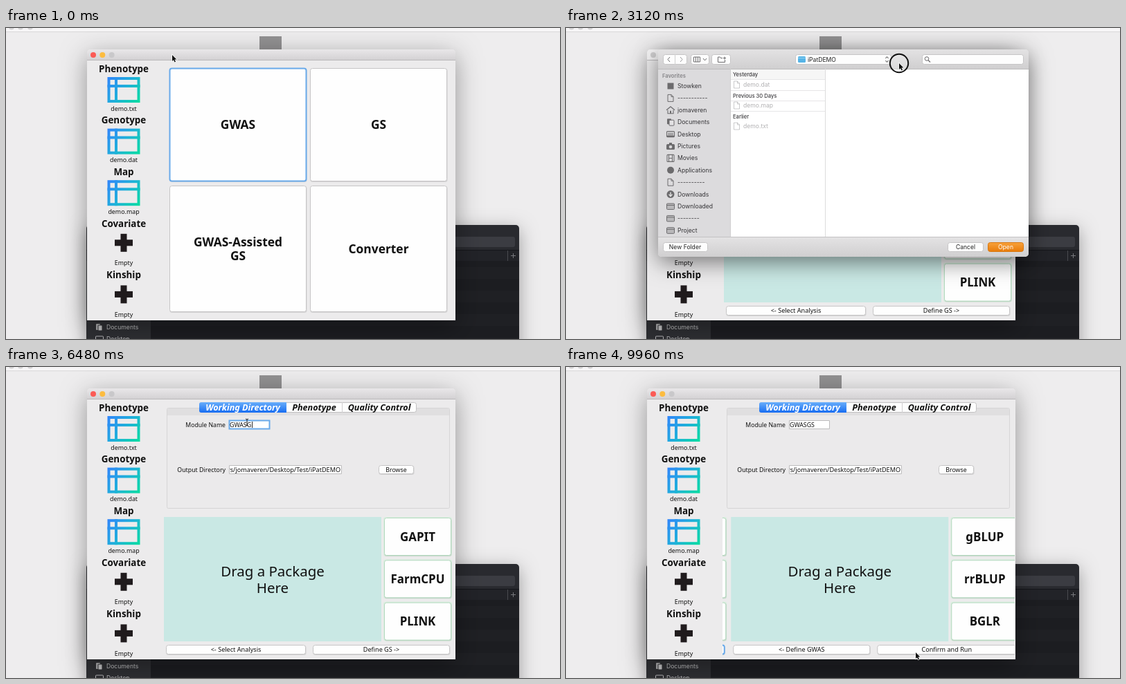
Recreate the animation shown at these times as an HTML page with a canvas. Size 800x450 px, loop 10 s.

```html
<!DOCTYPE html>
<html lang="en">
<head>
<meta charset="utf-8">
<title>Analysis setup</title>
<style>
html, body { margin: 0; width: 100%; height: 100%; overflow: hidden; background: #eeedee; }
canvas { display: block; }
</style>
</head>
<body>
<canvas id="stage" width="800" height="450"></canvas>
<script>
const c = document.getElementById('stage').getContext('2d');
const LOOP = 10000, PAGE = 422;
const UI = '"Noto Sans", "Open Sans", sans-serif', SYS = 'Inter, Roboto, sans-serif';
const BODY = '#ecebec', LINE = '#c6c5c6', FOCUS = '#69aaea', USER = 'jomaveren';

const clamp = v => Math.max(0, Math.min(1, v));
const within = (t, a, b) => t >= a && t < b;

// Cursor stops: time, x, y
const path = [
  [0, 240, 39], [620, 338, 318], [1150, 338, 318], [1800, 541, 151], [1920, 556, 149],
  [2250, 556, 149], [2900, 481, 51], [3200, 481, 51], [3750, 634, 317], [4250, 634, 317],
  [5000, 348, 80], [6650, 348, 80], [7300, 586, 319], [7750, 586, 319], [8250, 400, 316],
  [8600, 400, 316], [9200, 505, 413], [10000, 505, 413]
];
const presses = [[720, 860], [1940, 2080], [3000, 3240], [3860, 4000], [5160, 5280],
  [5360, 5480], [7380, 7540], [8380, 8520], [9320, 9500]];

function cursorAt(t) {
  let i = 0;
  while (i < path.length - 2 && t >= path[i + 1][0]) i++;
  const [t0, x0, y0] = path[i], [t1, x1, y1] = path[i + 1];
  let k = clamp((t - t0) / (t1 - t0));
  k = k * k * (3 - 2 * k);
  return [x0 + (x1 - x0) * k, y0 + (y1 - y0) * k];
}

function rect(x, y, w, h, fill) {
  c.fillStyle = fill;
  c.fillRect(x, y, w, h);
}
function box(x, y, w, h, r, fill, stroke, lw = 1) {
  c.beginPath();
  c.roundRect(x, y, w, h, r);
  if (fill) { c.fillStyle = fill; c.fill(); }
  if (stroke) { c.strokeStyle = stroke; c.lineWidth = lw; c.stroke(); }
}
function disc(x, y, r, fill) {
  c.beginPath();
  c.arc(x, y, r, 0, 7);
  c.fillStyle = fill;
  c.fill();
}
function stroke(points, color, lw = 1) {
  c.beginPath();
  points.forEach(([x, y], i) => i ? c.lineTo(x, y) : c.moveTo(x, y));
  c.strokeStyle = color;
  c.lineWidth = lw;
  c.stroke();
}
// y is the middle of the capitals
function text(s, x, y, size, { align = 'center', style = '', color = '#111', family = UI } = {}) {
  c.font = `${style} ${size}px ${family}`;
  c.textAlign = align;
  c.fillStyle = color;
  c.fillText(s, x, y + size * 0.36);
}
const left = { align: 'left' }, bold = { style: 'bold' };
const sys = (s, x, y, o = {}) => text(s, x, y, o.size || 8.6, { align: 'left', family: SYS, color: '#444', ...o });

function shade(y0, y1, a, b) {
  const g = c.createLinearGradient(0, y0, 0, y1);
  g.addColorStop(0, a);
  g.addColorStop(1, b);
  return g;
}
const blue = (y, h) => shade(y, y + h, '#69aefa', '#176df2');

function shadowed(draw, blur, alpha, dy) {
  c.save();
  c.shadowColor = `rgba(0,0,0,${alpha})`;
  c.shadowBlur = blur;
  c.shadowOffsetY = dy;
  draw();
  c.restore();
}
function clipped(x, y, w, h, draw) {
  c.save();
  c.beginPath();
  c.rect(x, y, w, h);
  c.clip();
  draw();
  c.restore();
}

function backdrop() {
  rect(0, 0, 800, 450, '#eeedee');
  rect(0, 0, 800, 5, '#f7f6f7');
  rect(0, 5, 800, 1, '#d9d8d9');
  for (const x of [8, 21, 35]) disc(x, -1.5, 4, '#d3d2d3');
  rect(366, 12, 32, 32, '#929192');

  shadowed(() => box(116, 285, 625, 200, 5, '#292a2f'), 26, 0.35, 6);
  box(640, 302, 95, 15, 3, '#3b3c42');
  rect(116, 321, 625, 16, '#222328');
  rect(116, 321, 625, 1, '#15161a');
  rect(724, 322, 1, 15, '#4a4b50');
  stroke([[729, 329.5], [736, 329.5]], '#77787d');
  stroke([[732.5, 326], [732.5, 333]], '#77787d');
  rect(209, 337, 532, 113, '#1c1d21');
  for (let y = 346; y < 450; y += 34) rect(209, y, 532, 17, '#1f2024');
  rect(116, 337, 93, 113, '#2e2f33');
  box(130, 428, 6, 9, 1, '#a8a8aa');
  box(133, 430, 6, 8, 1, '#c2c2c4', '#2e2f33');
  sys('Documents', 145, 433, { color: '#c0c0c2' });
  box(129.5, 446, 11, 7, 1, null, '#b5b5b7');
  sys('Desktop', 145, 450, { color: '#c0c0c2' });
}

function tableIcon(x, y) {
  const g = c.createLinearGradient(x, y, x + 46, y + 37);
  g.addColorStop(0, '#3284fb');
  g.addColorStop(0.5, '#1fb0da');
  g.addColorStop(1, '#08dda0');
  c.strokeStyle = g;
  c.lineWidth = 4;
  c.strokeRect(x + 2, y + 2, 43, 33);
  stroke([[x + 12.5, y], [x + 12.5, y + 37]], g, 4);
  stroke([[x, y + 13], [x + 47, y + 13]], g, 4);
}
function plusIcon(x, y) {
  rect(x - 13, y - 4.5, 26, 9, '#201b1d');
  rect(x - 4.5, y - 13, 9, 26, '#201b1d');
}

function appWindow(active) {
  shadowed(() => box(117, 31, 532, 392, [5, 5, 0, 0], BODY), 36, 0.38, 9);
  box(117, 31, 532, 15, [5, 5, 0, 0], active ? shade(31, 46, '#e9e7e9', '#d3d1d3') : '#f4f3f4');
  rect(117, 46, 532, 1, '#bbb9bb');
  const lights = active ? ['#fb5b56', '#fcbc40', '#c9c8ca'] : Array(3).fill('#cfcecf');
  lights.forEach((col, i) => disc(126 + i * 13.3, 39, 4, col));
  const inputs = [['Phenotype', 'demo.txt'], ['Genotype', 'demo.dat'], ['Map', 'demo.map'],
    ['Covariate', 'Empty'], ['Kinship', 'Empty']];
  inputs.forEach(([title, file], i) => {
    const y = 59 + i * 74.6;
    text(title, 170, y, 13.4, bold);
    if (i < 3) tableIcon(146.5, y + 12);
    else plusIcon(170, y + 28);
    text(file, 170, y + 57.3, 8.9);
  });
}

function button(label, x, y, w, h, size, { border = LINE, focus, style = '', pressed } = {}) {
  box(x + 0.5, y + 1, w, h, 3, 'rgba(0,0,0,.1)');
  box(x + 0.5, y + 0.5, w - 1, h - 1, 3, pressed ? blue(y, h) : '#fefefe', focus ? FOCUS : border, focus ? 2 : 1);
  const lines = label.split('\n');
  lines.forEach((s, i) => text(s, x + w / 2, y + h / 2 + (i - (lines.length - 1) / 2) * 20, size, { style }));
}

function menu(t) {
  const big = (s, x, y, h, focus) => button(s, x, y, 198, h, 17.4, { style: 'bold', focus });
  const chosen = t > 720;
  big('GWAS', 236, 58, 164, !chosen);
  big('GS', 439, 58, 164);
  big('GWAS-Assisted\nGS', 236, 228, 183, chosen);
  big('Converter', 439, 228, 183);
}

function tabs(labels, edges, y) {
  const x = edges[0], w = edges[edges.length - 1] - x;
  box(x + 0.5, y + 0.5, w - 1, 14, 3, '#fdfdfd', '#c2c1c2');
  box(x, y, edges[1] - x, 15, [3, 0, 0, 3], blue(y, 15));
  labels.forEach((s, i) => {
    if (i > 1) rect(edges[i], y, 1, 15, '#cfcecf');
    text(s, (edges[i] + edges[i + 1]) / 2, y + 7.3, 12.6,
      { style: 'italic bold', color: i ? '#111' : '#fff' });
  });
}
function group(x, y, w, h) {
  box(x + 0.5, y + 0.5, w - 1, h - 1, 2, '#ebeaeb', '#d6d5d6');
  rect(x + 1, y + 1, w - 2, 10, '#e0dfe0');
}
function field(x, y, w, focus) {
  box(x + 0.5, y + 0.5, w - 1, 12, 0, '#fff', focus ? FOCUS : '#bdbcbd', focus ? 2 : 1);
}

function directoryPanel(t) {
  group(232, 59, 409, 146);
  tabs(['Working Directory', 'Phenotype', 'Quality Control'], [279, 405, 485, 593], 51);
  text('Module Name', 317, 83.5, 8.7, { align: 'right' });
  const editing = within(t, 5160, 7400);
  field(322, 77, 59, editing);
  const typed = Math.floor((t - 5550) / 170);
  const name = typed < 1 ? 'Project' : 'GWASGS'.slice(0, typed);
  if (within(t, 5360, 5720)) rect(323, 78, 31, 11, '#a9cdf8');
  text(name, 323, 83.5, 8.8, left);
  if (editing && typed > 0 && t % 1000 < 600) rect(324 + c.measureText(name).width, 79, 1, 9, '#222');

  text('Output Directory', 317, 148.5, 8.8, { align: 'right' });
  field(322, 142, 163);
  clipped(323, 142, 161, 13, () => {
    if (t < 4080) text('/Users/' + USER, 323, 148.5, 8.9, left);
    else text(`/Users/${USER}/Desktop/Test/iPatDEMO`, 483, 148.5, 9.1, { align: 'right' });
  });
  button('Browse', 538, 142, 51, 13, 8.8, { pressed: within(t, 1940, 2080) });
}

function dropZone(lines, fill) {
  rect(228, 217, 314, 180, fill);
  lines.forEach((s, i) => text(s, 385, 307.5 + (i - (lines.length - 1) / 2) * 24, 20.5));
}
function packages(names, focused) {
  names.forEach((s, i) => {
    const y = 218 + i * 61.3;
    box(545, y - 1, 99, 57, 3, '#dcefe1');
    button(s, 546, y, 97, 55, 16.9, { style: 'bold', border: '#b3d8be', focus: s === focused });
  });
}

function details() {
  rect(228, 217, 314, 180, '#c9dfeb');
  rect(233, 227, 304, 165, '#e9e8e9');
  group(234, 227, 302, 163);
  tabs(['FarmCPU input', 'Covariates'], [292, 398, 478], 219);
  text('Method bin', 323, 272, 8.8, left);
  box(376.5, 265.5, 68, 13, 3, '#fff', LINE);
  box(433, 265, 12, 14, [0, 3, 3, 0], blue(265, 14));
  stroke([[437, 270.5], [439, 268], [441, 270.5]], '#fff');
  stroke([[437, 273.5], [439, 276], [441, 273.5]], '#fff');
  text('optimum', 384, 272, 8.8, left);
  text('maxLoop :', 322, 320, 8.8, left);
  text('10', 409, 320, 8.8);
  box(330, 337, 110, 2, 1, '#b5b4b5');
  for (let i = 0; i < 10; i++) {
    const x = 331 + i * 12.05;
    rect(x - 0.5, 344, 1, 3.5, '#555');
    text(String(i + 1), x, 354, 8.8);
  }
  c.beginPath();
  c.moveTo(434.5, 333);
  c.lineTo(445.5, 333);
  c.lineTo(445.5, 339);
  c.lineTo(440, 345);
  c.lineTo(434.5, 339);
  c.closePath();
  c.fillStyle = '#fff';
  c.fill();
  c.strokeStyle = '#b4b3b4';
  c.lineWidth = 1;
  c.stroke();
}

const footer = (s, x, w, o) => button(s, x, 402, w, 14, 9.1, o);

function gwasPage(t) {
  if (t < 7500) dropZone(['Drag a Package', 'Here'], '#c9e8e4');
  else if (t < 8520) dropZone(['FarmCPU', 'Selected', '(Tap for details)'], '#c9dfeb');
  else details();
  packages(['GAPIT', 'FarmCPU', 'PLINK'], within(t, 7400, 8380) ? 'FarmCPU' : '');
  footer('<- Select Analysis', 231, 202);
  footer('Define GS ->', 443, 198, { pressed: within(t, 9320, 9500), focus: t >= 9500 });
}
function gsPage() {
  dropZone(['Drag a Package', 'Here'], '#c9e8e4');
  packages(['gBLUP', 'rrBLUP', 'BGLR']);
  footer('<- Define GWAS', 231, 198);
  footer('Confirm and Run', 439, 201);
}

function slide(p, from, to) {
  const page = (dx, draw) => {
    if (Math.abs(dx) >= PAGE) return;
    c.save();
    c.translate(dx, 0);
    draw();
    c.restore();
  };
  clipped(226, 47, PAGE, 376, () => {
    page(-PAGE * p, from);
    page(PAGE * (1 - p), to);
  });
}

function sideIcon(kind, x, y) {
  const ink = '#6c6b6d';
  const frame = (w, h) => box(x - w / 2, y - h / 2, w, h, 1, null, ink, 1.1);
  if (kind === 'disc') disc(x, y, 5, ink);
  else if (kind === 'square') rect(x - 4.5, y - 4.5, 9, 9, ink);
  else if (kind === 'page') {
    stroke([[x + 1, y - 5], [x - 4, y - 5], [x - 4, y + 5], [x + 4, y + 5], [x + 4, y - 2], [x + 1, y - 5], [x + 1, y - 2], [x + 4, y - 2]], ink);
  } else if (kind === 'home') {
    stroke([[x - 6, y], [x, y - 5], [x + 6, y]], ink, 1.3);
    stroke([[x - 4, y], [x - 4, y + 5], [x + 4, y + 5], [x + 4, y]], ink, 1.1);
    rect(x - 1, y + 1, 2, 4, ink);
  } else if (kind === 'pages') {
    box(x - 5, y - 5, 6, 8, 1, ink);
    box(x - 2, y - 3, 7, 8, 1, '#e3e2e4', ink);
  } else if (kind === 'screen') {
    frame(11, 8);
    rect(x - 4, y - 2, 8, 4, '#a4a3a5');
    rect(x - 5, y + 2, 10, 2, ink);
  } else if (kind === 'camera') {
    box(x - 6, y - 3, 12, 8, 1.5, ink);
    rect(x - 2, y - 5, 4, 2, ink);
    disc(x, y + 1, 2.3, '#d7d6d8');
  } else if (kind === 'film') {
    frame(10, 10);
    rect(x - 3, y - 5, 1, 10, ink);
    rect(x + 2, y - 5, 1, 10, ink);
    rect(x - 3, y - 0.5, 6, 1, ink);
  } else if (kind === 'down') {
    disc(x, y, 5.5, ink);
    stroke([[x, y - 3], [x, y + 3]], '#eee', 1.3);
    stroke([[x - 2.5, y], [x, y + 3], [x + 2.5, y]], '#eee', 1.2);
  } else {
    box(x - 5.5, y - 4, 11, 8.5, 1, '#b9b8ba', ink);
    rect(x - 5, y - 2, 10, 1, ink);
  }
}

const places = [['Stowken', 'square'], ['-----------', 'page'], [USER, 'home'], ['Documents', 'pages'],
  ['Desktop', 'screen'], ['Pictures', 'camera'], ['Movies', 'film'], ['Applications', 'disc'],
  ['----------', 'page'], ['Downloads', 'down'], ['Downloaded', 'folder'], ['--------', 'folder'],
  ['Project', 'folder']];

function dialogButton(x, y, w, h, fill = '#fdfdfd', edge = '#c6c5c6') {
  box(x + 0.5, y + 0.5, w - 1, h - 1, 3, fill, edge);
}

function dialog() {
  shadowed(() => box(133, 31, 535, 300, 5, BODY), 32, 0.5, 8);
  c.save();
  c.beginPath();
  c.roundRect(133, 31, 535, 300, 5);
  c.clip();
  rect(133, 31, 535, 28, shade(31, 59, '#e3e2e3', '#d0cfd0'));
  rect(133, 59, 104, 243, '#dcdbdd');
  rect(237, 59, 431, 243, '#fff');
  rect(133, 302, 535, 29, shade(302, 331, '#e4e3e4', '#d0cfd0'));
  rect(133, 59, 535, 1, '#bdbcbd');
  rect(133, 302, 535, 1, '#c3c2c3');
  rect(237, 59, 1, 243, '#d0cfd0');
  rect(374, 59, 1, 243, '#dddcdd');
  c.restore();

  const ink = '#6b6a6c';
  dialogButton(140, 38, 35, 15);
  rect(157, 38, 1, 15, '#d0cfd0');
  stroke([[150, 42], [147, 45.5], [150, 49]], ink);
  stroke([[165, 42], [168, 45.5], [165, 49]], '#9a999b');
  dialogButton(180, 38, 27, 15);
  box(184.5, 42, 9, 7, 0, null, ink);
  rect(187, 42, 1, 7, ink);
  rect(190, 42, 1, 7, ink);
  stroke([[198, 44], [200.5, 47], [203, 44]], ink);
  dialogButton(210, 38, 28, 15);
  stroke([[226, 43.5], [223.5, 43.5], [222.5, 42], [219.5, 42], [219.5, 49.5], [229.5, 49.5], [229.5, 46]], ink);
  stroke([[227, 43.5], [231, 43.5]], ink);
  stroke([[229, 41.5], [229, 45.5]], ink);

  dialogButton(331, 38, 139, 15);
  box(335, 41, 11, 9, 1.5, '#56b4e6');
  rect(335, 43, 11, 1, '#8fd0f1');
  sys('iPatDEMO', 349, 45.5, { color: '#222' });
  stroke([[461.5, 44], [463.5, 41.5], [465.5, 44]], '#444');
  stroke([[461.5, 47], [463.5, 49.5], [465.5, 47]], '#444');
  dialogButton(514, 38, 147, 15);
  c.beginPath();
  c.arc(521, 44.5, 2.8, 0, 7);
  c.strokeStyle = ink;
  c.lineWidth = 1;
  c.stroke();
  stroke([[523, 46.5], [526, 49.5]], ink, 1.2);

  sys('Favorites', 139, 69, { size: 7.6, style: '600', color: '#858487' });
  places.forEach(([label, kind], i) => {
    const y = 84 + i * 17.4;
    sideIcon(kind, 151, y);
    sys(label, 161, y, { color: '#353437' });
  });

  rect(238, 60, 136, 14, '#f6f6f6');
  for (const y of [74, 90, 105, 120]) rect(238, y, 136, 1, '#e6e5e7');
  [['Yesterday', 67], ['Previous 30 Days', 98], ['Earlier', 128]].forEach(([s, y]) =>
    sys(s, 241, y, { size: 7.6, style: '500', color: '#3d3c3f' }));
  [['demo.dat', 82], ['demo.map', 112], ['demo.txt', 142]].forEach(([s, y]) => {
    c.save();
    c.globalAlpha *= 0.35;
    sideIcon('page', 246.5, y);
    c.restore();
    sys(s, 256, y, { color: '#b2b1b3' });
  });

  const label = { align: 'center', color: '#222' };
  dialogButton(140, 310, 65, 14);
  sys('New Folder', 172, 317, label);
  dialogButton(551, 310, 52, 14);
  sys('Cancel', 577, 317, label);
  dialogButton(609, 310, 52, 14, shade(310, 324, '#f8a33d', '#e87a08'), '#d9780f');
  sys('Open', 635, 317, { align: 'center', color: '#fff' });
}

function pointer(t) {
  const [x, y] = cursorAt(t);
  const press = presses.find(([a, b]) => within(t, a, b));
  if (press) {
    c.beginPath();
    c.arc(x, y, 8.5 + 4.7 * clamp((t - press[0]) / 100), 0, 7);
    c.fillStyle = 'rgba(255,255,255,.25)';
    c.fill();
    c.strokeStyle = '#111';
    c.lineWidth = 2;
    c.stroke();
  }
  if (within(t, 4900, 6750)) {
    stroke([[x - 2, y - 5], [x, y - 4], [x + 2, y - 5]], '#222');
    stroke([[x, y - 4], [x, y + 4]], '#222');
    stroke([[x - 2, y + 5], [x, y + 4], [x + 2, y + 5]], '#222');
    return;
  }
  c.save();
  c.translate(x, y);
  c.beginPath();
  [[0, 0], [0, 9], [2, 7.2], [3.5, 10.4], [5, 9.7], [3.6, 6.6], [6.4, 6.5]]
    .forEach(([px, py]) => c.lineTo(px, py));
  c.closePath();
  c.strokeStyle = '#fff';
  c.lineWidth = 1.4;
  c.stroke();
  c.fillStyle = '#111';
  c.fill();
  c.restore();
}

function draw(t) {
  const open = within(t, 2140, 4080);
  backdrop();
  appWindow(!open);
  if (t < 1400) {
    slide(clamp((t - 880) / 452), () => menu(t), () => { directoryPanel(t); gwasPage(t); });
  } else {
    directoryPanel(t);
    slide(clamp((t - 9520) / 452), () => gwasPage(t), gsPage);
  }
  if (open) {
    c.save();
    c.globalAlpha = clamp((t - 2100) / 120);
    dialog();
    c.restore();
  }
  pointer(t);
}

function frame() {
  draw(performance.now() % LOOP);
  requestAnimationFrame(frame);
}
frame();
</script>
</body>
</html>
```
